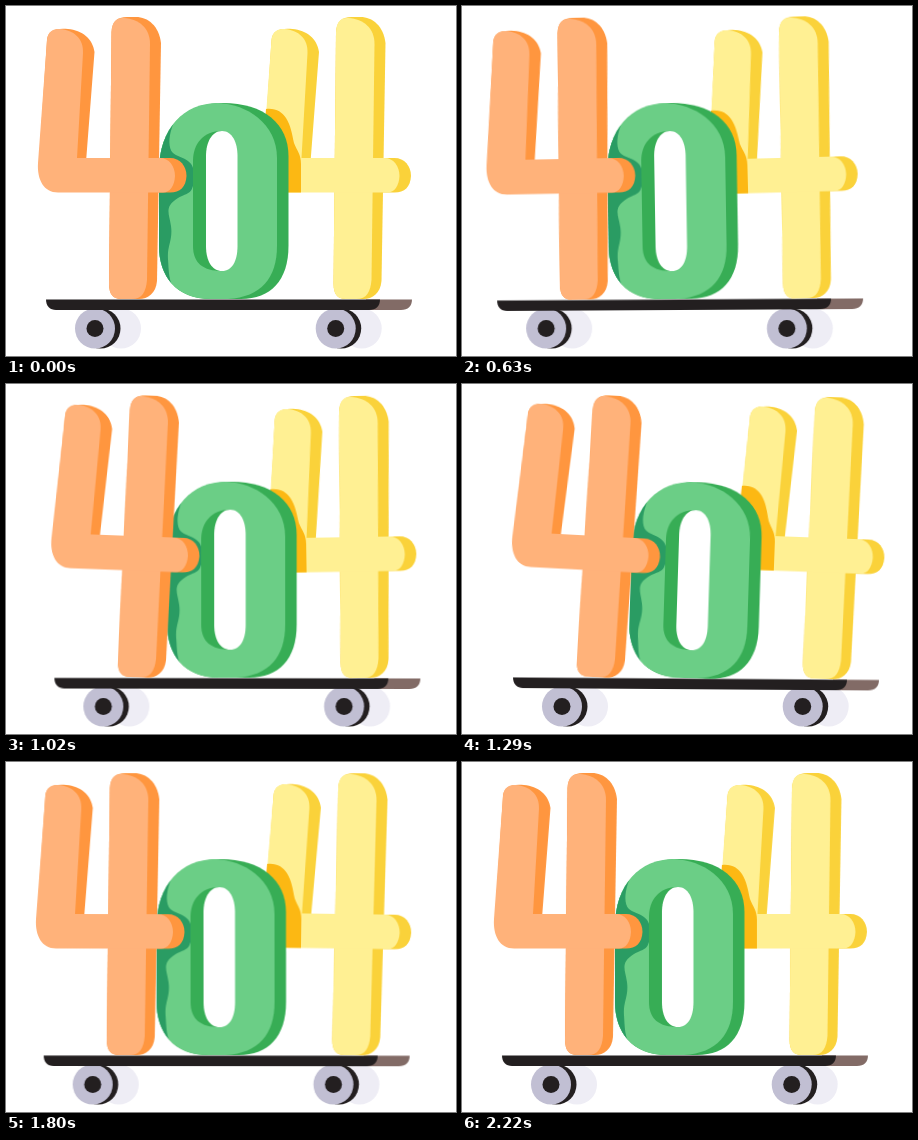
An HTML page that plays this animation: 450 px wide and 350 px high, repeating every 2.25 s.

```html
<!DOCTYPE html>
<html lang="en">
<head>
<meta charset="utf-8">
<title>404</title>
<style>
  :root {
    --in: cubic-bezier(.11, 0, .5, 0);
    --out: cubic-bezier(.5, 1, .89, 1);
    --both: cubic-bezier(.65, 0, .35, 1);
  }
  html, body { margin: 0; width: 100%; height: 100%; overflow: hidden; background: #fff; }
  svg { display: block; width: 100%; height: 100%; }
  .warm { --light: #ffb27a; --dark: #ff963f; }
  .sunny { --light: #fff093; --dark: #fad23a; }
  .light { fill: var(--light); }
  .dark { fill: var(--dark); }

  #ride, #rock, #orange, #green, #yellow { animation: 2250ms var(--both) infinite; }
  #ride { animation-name: ride; }
  #rock { animation-name: rock; transform-origin: 223px 298px; }
  #orange { animation-name: lead; transform-origin: 130px 293px; }
  #green { animation-name: follow; transform-origin: 217px 363px; }
  #yellow { animation-name: trail; transform-origin: 353px 353px; }

  @keyframes ride {
    0% { transform: translateX(0); animation-timing-function: var(--in); }
    22.2% { transform: translateX(-8px); animation-timing-function: var(--out); }
    64.4% { transform: translateX(11.3px); }
    86.7% { transform: translateX(-4px); }
    100% { transform: translateX(0); }
  }
  @keyframes rock {
    0%, 100% { transform: translateY(0) rotate(0deg); }
    26.7% { transform: translateY(0) rotate(-.35deg); }
    62.2% { transform: translateY(1.2px) rotate(.42deg); }
    88.9% { transform: translateY(0) rotate(-.05deg); }
  }
  @keyframes lead {
    0% { transform: rotate(0deg); animation-timing-function: var(--in); }
    24% { transform: rotate(-1.1deg); animation-timing-function: var(--out); }
    64.4% { transform: rotate(2.7deg); }
    86.7% { transform: rotate(-.2deg); }
    100% { transform: rotate(0deg); }
  }
  @keyframes follow {
    0%, 13.3%, 100% { transform: rotate(0deg); }
    32.9% { transform: rotate(-.6deg); }
    64.9% { transform: rotate(1.5deg); }
    87.1% { transform: rotate(-.3deg); }
  }
  @keyframes trail {
    0%, 100% { transform: rotate(0deg); }
    16.9% { transform: rotate(.4deg); }
    34.7% { transform: rotate(-1.55deg); }
    66.7% { transform: rotate(2.1deg); }
    92.4% { transform: rotate(-.3deg); }
  }
</style>
</head>
<body>
<svg viewBox="0 0 450 350">
  <defs>
    <g id="four">
      <path class="dark" d="M41 34C42 24 50 22 62 23C76 24 87 33 88.500 46L80 156H33Z"/>
      <path class="dark" d="M105.500 26C106 16 111 11 121 11H130C142 11 153 20 155 37L151 275C150 287 142 293 133 293H115C107 293 103 288 103 278Z"/>
      <path class="light" d="M105.500 26C106 16 110 11.500 118 12C133 13 144 22 144 38L141 274C140 286 136 293 126 293H115C107 293 103 288 103 278Z"/>
      <path class="dark" d="M150 152H164C174 152 180.500 160 180.500 170C180 181 174 186.500 164 186.500H150Z"/>
      <path class="light" d="M41 34C42 25 47 23 54 23C68 24 78 33 77 47L71 152H154C163 152 169 160 169 170C168.500 180 164 186.500 157 186.500H52C38 186.500 31 174 32 157Z"/>
    </g>
    <g id="wheel">
      <circle cx="26" r="20" fill="#eeedf5"/>
      <circle cx="5.500" r="20" fill="#231f20"/>
      <circle r="20" fill="#c1bfd3"/>
      <circle r="8.500" fill="#231f20"/>
    </g>
    <path id="ring" d="M153 165C153 122 178 97 217 97C258 97 282.500 118 282.500 150V240C282.500 274 265 293 235 293H205C170 293 153 270 153 240Z"/>
    <clipPath id="inRing"><use href="#ring"/></clipPath>
  </defs>

  <g id="ride">
    <use href="#wheel" x="89" y="322.500"/>
    <use href="#wheel" x="329.700" y="322.500"/>
    <g id="rock">
      <path fill="#826b66" d="M360 293.500H406C406 300 402 304 395 304H360Z"/>
      <path fill="#231f20" d="M40 293.500H374C374 300 370 304 363 304H50C44 304 40 300 40 293.500Z"/>
      <g id="yellow">
        <use href="#four" x="224.500" class="sunny"/>
        <path fill="#fcb813" d="M260 103C270 102 276 106 280 112C285 120 286 128 288 137C291 145 295 148 295 158V186.500H256V155Z"/>
      </g>
      <g id="green">
        <use href="#ring" fill="#37ad55"/>
        <path fill="#6bce86" d="M153 165C153 122 178 97 212 97C240 98 271 117 271 152V240C271 272 255 291 222 293H205C170 293 153 270 153 240Z"/>
        <path clip-path="url(#inRing)" fill="#2a9c63" d="M172 108C164 122 160 140 167 147C174 153 188 152 188 168C188 190 182 186 172 192C158 201 163 207 165 220C167 234 161 240 162 253C163 266 162 274 170 287L145 290V110Z"/>
        <path fill="#37ad55" d="M216 125C197 125 187 138 187 155V240C187 257 197 265 216 265Z"/>
        <path fill="#fff" d="M200 150C200 136 206 125 216 125C226 125 231.500 136 231.500 150V240C231.500 255 226 265 216 265C206 265 200 255 200 240Z"/>
      </g>
      <g id="orange"><use href="#four" class="warm"/></g>
    </g>
  </g>
</svg>
</body>
</html>
```
